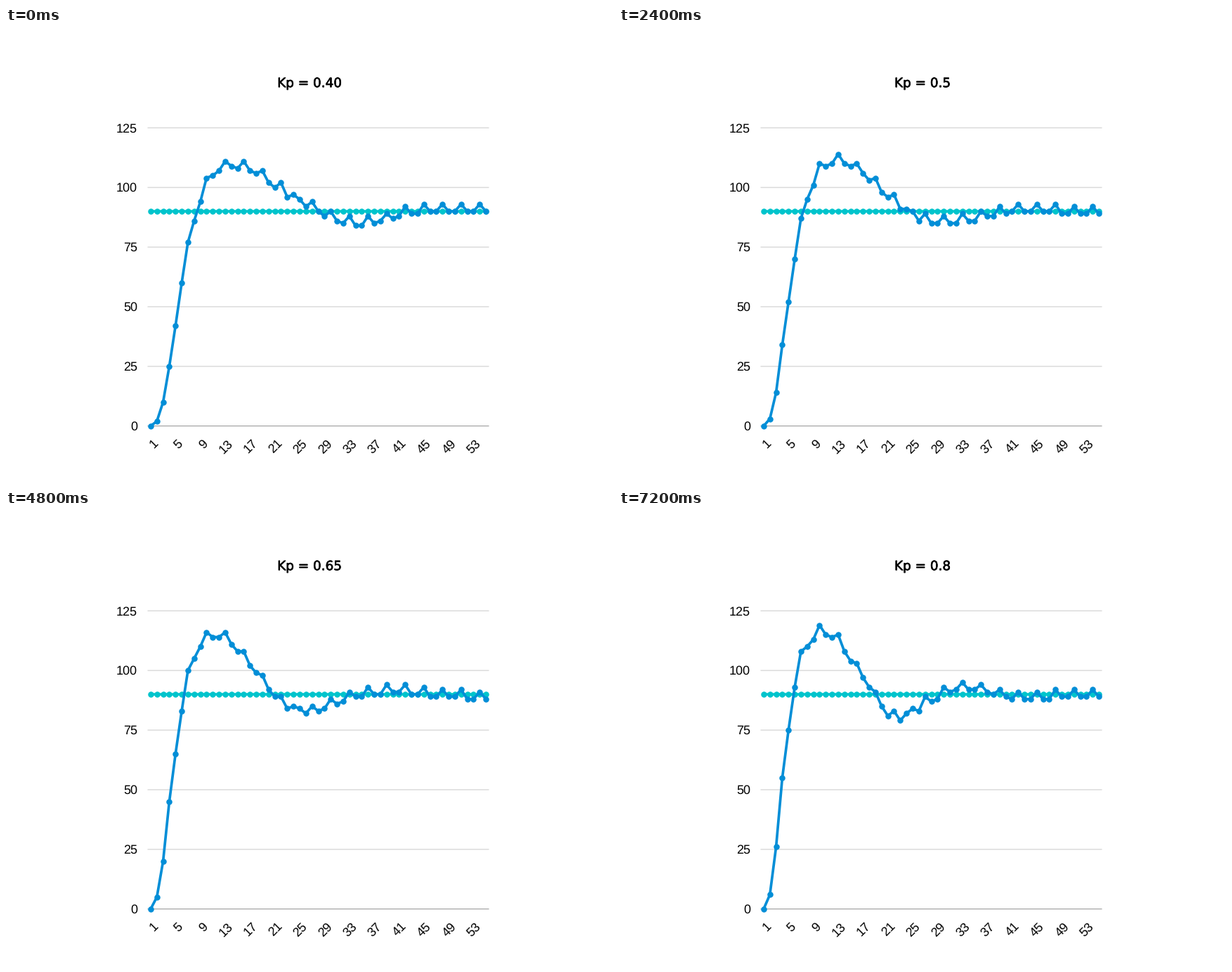
Recreate the animation shown at these times as a matplotlib script. Size 864 by 648 pixels, loop 8400 ms.

```python
import numpy as np
import matplotlib.pyplot as plt
from matplotlib.animation import FuncAnimation
from matplotlib.patheffects import withStroke

plt.rcParams["text.hinting"] = "no_hinting"

W, H = 864, 648
LEFT, RIGHT, BASE = 201.5, 687.5, 566.8
UNIT = 3.397          # pixels per unit of value
COUNT = 55
STEP = (RIGHT - LEFT) / COUNT
SETPOINT = 90
TEAL, BLUE = "#00c4cc", "#028ed7"

GAINS = ["0.40", "0.45", "0.5", "0.6", "0.65", "0.7", "0.8"]

# Key points of the smooth response at a low, middle and high gain.
KEYS = [1, 2, 3, 4, 7, 8, 10, 13, 17, 22, 27, 32, 37, 42, 48, 55]
SWINGS = {
    0.4: [0, 2, 10, 25, 77, 87, 102, 109, 108, 99.5, 92, 86, 86, 89.5, 91, 91],
    0.6: [0, 4, 18, 42, 97, 104, 113, 114.5, 105, 89.5, 82, 86.5, 91, 92.5, 90, 89],
    0.8: [0, 6, 26, 55, 108, 111, 116.5, 112.5, 97.5, 80.5, 86.5, 93, 91.5, 89, 89.5, 90],
}

index = np.arange(1, COUNT + 1)
xs = LEFT + STEP * (index - 0.5)


def y_of(value):
    return BASE - UNIT * np.asarray(value)


def spline(x, kx, ky):
    """Cubic Hermite curve through the key points."""
    kx, ky = np.asarray(kx, float), np.asarray(ky, float)
    px, py = np.pad(kx, 1, mode="edge"), np.pad(ky, 1, mode="edge")
    slope = (py[2:] - py[:-2]) / (px[2:] - px[:-2])
    k = np.clip(np.searchsorted(kx, x, side="right") - 1, 0, len(kx) - 2)
    h = kx[k + 1] - kx[k]
    u = (x - kx[k]) / h
    ease = u * u * (3 - 2 * u)
    return (ky[k] + ease * (ky[k + 1] - ky[k])
            + h * u * (1 - u) * ((1 - u) * slope[k] - u * slope[k + 1]))


def ripple():
    """Three-step wobble whose phase slips by one step on the way down."""
    shift = np.interp(index, [22, 27], [1, 0])
    wave = 2 * np.cos(2 * np.pi * (index - shift) / 3)
    return np.where(index >= 8, wave, 0)


def response(kp):
    gains = list(SWINGS)
    keys = [np.interp(kp, gains, column) for column in zip(*SWINGS.values())]
    return np.floor(spline(index, KEYS, keys) + ripple() + 0.5)


# At 72 dpi one point is one pixel.
fig = plt.figure(figsize=(W / 72, H / 72), dpi=72, facecolor="white")
ax = fig.add_axes([0, 0, 1, 1])
ax.set_xlim(0, W)
ax.set_ylim(H, 0)
ax.axis("off")

label = dict(family="Liberation Sans", fontsize=18, color="black",
             ha="right", va="baseline")
for value in range(0, 126, 25):
    y = y_of(value)
    ax.plot([LEFT, RIGHT], [y, y], lw=1.2, solid_capstyle="butt", snap=False,
            color="#d2d2d2" if value else "#a0a0a0")
    ax.text(187.1, y + 6.2, str(value), **label)

for n in range(1, COUNT, 4):
    ax.text(xs[n - 1] + 11.4, 592.3, str(n), rotation=45,
            rotation_mode="anchor", **label)

style = dict(lw=3.7, marker="o", ms=8.5, mew=0, solid_joinstyle="round",
             snap=False)
ax.plot(xs, np.full(COUNT, y_of(SETPOINT)), color=TEAL, **style)
line, = ax.plot(xs, y_of(response(float(GAINS[0]))), color=BLUE, **style)
title = ax.text(W / 2, 84.2, "", family="DejaVu Sans", fontsize=18.4,
                color="black", ha="center", va="baseline",
                path_effects=[withStroke(linewidth=0.6, foreground="black")])


def update(i):
    title.set_text(f"Kp = {GAINS[i]}")
    line.set_ydata(y_of(response(float(GAINS[i]))))
    return title, line


anim = FuncAnimation(fig, update, frames=len(GAINS), interval=1200, repeat=True)
plt.show()
```
